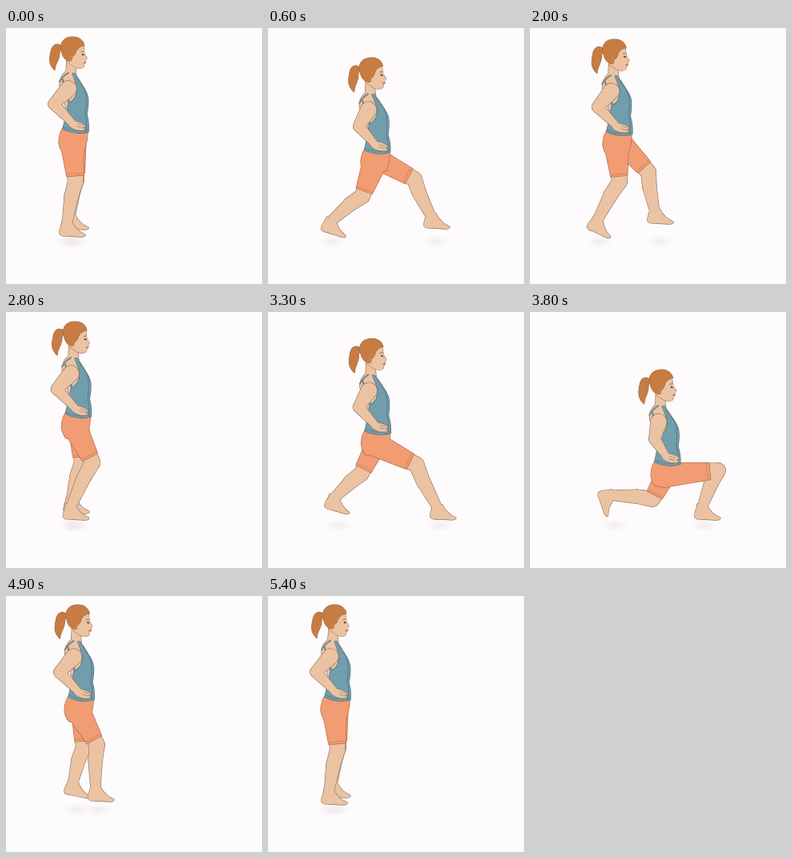
Animation of 320x320 px, one loop 5500 ms. Source, as an HTML page with a canvas:

```html
<!DOCTYPE html>
<html>
<head>
<meta charset="utf-8">
<style>
html, body { margin: 0; height: 100%; overflow: hidden; background: #fefbfc; }
canvas { display: block; width: 100vw; height: 100vh; }
</style>
</head>
<body>
<canvas></canvas>
<script>
const LUNGE = 2750, STEP = 100;
const SKIN = '#ebc3a2', SKIN_LINE = '#8d7565', SHORTS = '#f19c72', SHORTS_LINE = '#a9694f';
const SHIRT = '#719eac', SHIRT_LINE = '#4f6872', HAIR = '#c67c42', HAIR_LINE = '#9a5b2c';

const canvas = document.querySelector('canvas'), ctx = canvas.getContext('2d');
canvas.width = canvas.height = 320 * Math.max(1, devicePixelRatio);
ctx.scale(canvas.width / 320, canvas.height / 320);
ctx.lineJoin = ctx.lineCap = 'round';

// One lunge serves both legs. Body: time, shift x, y
const BODY = [
  [0, 0, 0], [50, 3, 1], [250, 14, 4], [600, 50, 26], [850, 70, 51], [1050, 76, 61],
  [1400, 76, 62], [1850, 44, 21], [2000, 25, 3], [2300, -4, -1], [LUNGE, 0, 0]];

// Monotone cubic through the keys, so held poses stay still
function sample(keys, t) {
  let i = 0;
  while (i < keys.length - 2 && keys[i + 1][0] <= t) i++;
  const a = keys[i], b = keys[i + 1], h = b[0] - a[0], u = (t - a[0]) / h;
  const rate = (j, c) => j < 0 || j > keys.length - 2 ? 0 :
    (keys[j + 1][c] - keys[j][c]) / (keys[j + 1][0] - keys[j][0]);
  const slope = (j, c) => {
    const p = rate(j - 1, c), q = rate(j, c);
    return p * q > 0 ? 2 * p * q / (p + q) : 0;
  };
  return a.slice(1).map((v, k) => {
    const c = k + 1, w = 1 - u;
    return v * (1 + 2 * u) * w * w + b[c] * u * u * (3 - 2 * u)
      + h * u * w * (slope(i, c) * w - slope(i + 1, c) * u);
  });
}

// Stepping leg: time, knee shift x, y, ankle shift x, y
const FRONT = [
  [0, 0, 0, 0, 0], [50, 19, -4, 4, -1], [250, 42, -8, 50, -5], [600, 95, 0, 124, -1],
  [850, 124, 5, 124, -1], [1050, 132, 6, 124, -1], [1400, 133, 6, 124, -1],
  [1850, 82, 4, 122, -2], [2000, 60, -9, 76, -7], [2150, 24, -6, 32, -4], [2300, 0, 0, 0, 0],
  [LUNGE, 0, 0, 0, 0]];

function stepPose(t, [kx, ky, ax, ay], stride) {
  const [dkx, dky, dax, day] = sample(FRONT, t);
  return [kx + dkx * stride, ky + dky, ax + dax * stride, ay + day, 0];
}

// Trailing leg: the same, then foot pitch
const REAR = [
  [0, 0, 0, 0, 0, 0], [50, 7, -1, 1, 0, 0], [600, 31, 18, 2, -4, 15], [850, 55, 43, 14, -7, 48],
  [1050, 65, 51, 20, -8, 68], [1400, 65, 51, 20, -8, 68], [1850, 42, 14, 10, -6, 30],
  [2000, 25, 0, 8, -5, 22], [2300, 0, 0, 0, 0, 0], [LUNGE, 0, 0, 0, 0, 0]];

function trailPose(t, [kx, ky, ax, ay], dip) {
  const [dkx, dky, dax, day, pitch] = sample(REAR, t);
  return [kx + dkx, ky + dky * dip, ax + dax, ay + day, pitch];
}

const NEAR_STAND = [87, 192, 76, 246], FAR_STAND = [88, 189, 80, 237];

const shape = d => new Path2D(d);
const FOOT = shape('M-6-5C-6 2-10 6-9 11Q-7 15 0 14L18 15Q24 15 23 12Q12 8 6-4Z');
const TORSO = shape('M76 40L75 54Q66 62 67 72L75 100H95L97 75Q92 65 88 61L87 51L92 40Z');
const TOP = shape('M71 64Q74 82 79 90Q76 108 71 126Q86 134 103 130Q104 118 101 108Q104 92 102 85Q99 75 92 69L86 57L83 57Q87 67 89 74Q90 88 79 94Q72 80 71 64Z');
const FACE = shape('M84 18Q95 16 97 23L98 32L101.5 38L99.5 40L100 43L98 45L97 49Q93 52 86 49L76 42V25Z');
const CAP = shape('M69 27C67 18 73 11 83 11C92 11 97 16 98 22Q92 22 88 28Q87 34 82 37Q84 42 78 41C72 39 70 34 69 27Z');
const TAIL = shape('M70 23C64 17 57 21 56 30C54 38 53 46 61 53C61 45 67 40 67 32Q67 26 71 28Z');
const PELVIS = shape('M71 125Q66 133 66 143Q67 152 72 157L98 152Q102 142 102 129Z');
const HAND = shape('M80 116Q90 116 98 121Q101 123 96 124L99 127Q95 129 87 127Q81 125 78 121Z');

// Outlines the union of several shapes
function draw(paths, fill, stroke, width = 1.3) {
  ctx.strokeStyle = stroke;
  ctx.fillStyle = fill;
  ctx.lineWidth = width;
  paths.forEach(p => ctx.stroke(p));
  paths.forEach(p => ctx.fill(p));
}

function line(d, color, width) {
  ctx.strokeStyle = color;
  ctx.lineWidth = width;
  ctx.stroke(shape(d));
}

function limb([ax, ay], ra, [bx, by], rb, flat) {
  const p = new Path2D(), d = Math.atan2(by - ay, bx - ax), q = Math.PI / 2;
  p.arc(ax, ay, ra, d + q, d + 3 * q);
  if (flat) {
    p.lineTo(bx + rb * Math.sin(d), by - rb * Math.cos(d));
    p.lineTo(bx - rb * Math.sin(d), by + rb * Math.cos(d));
  } else p.arc(bx, by, rb, d - q, d + q);
  p.closePath();
  return p;
}

function moved(path, x, y, angle = 0) {
  const p = new Path2D();
  p.addPath(path, new DOMMatrix().translate(x, y).rotate(angle));
  return p;
}

const mix = (a, b, k) => a.map((v, i) => v + (b[i] - v) * k);

function leg(hip, hipSize, [kx, ky, ax, ay, pitch], extra = []) {
  const knee = [kx, ky], ankle = [ax, ay], len = Math.hypot(ax - kx, ay - ky);
  const calf = mix(knee, ankle, .35);
  calf[0] -= (ay - ky) / len * 1.5;
  calf[1] += (ax - kx) / len * 1.5;
  draw([limb(hip, 11, knee, 9.3), limb(knee, 9.3, calf, 8.6), limb(calf, 8.6, ankle, 5.8),
    moved(FOOT, ax, ay, pitch)], SKIN, SKIN_LINE);
  draw([limb(hip, hipSize, mix(hip, knee, .85), 10.5, true), ...extra], SHORTS, SHORTS_LINE);
  ctx.strokeStyle = '#d9845d';
  ctx.lineWidth = .6;
  ctx.stroke(limb(mix(hip, knee, .79), 0, mix(hip, knee, .8), 10, true));
}

function shadow(x) {
  const g = ctx.createRadialGradient(0, 0, 0, 0, 0, 17);
  g.addColorStop(0, '#e9e4e6a0');
  g.addColorStop(1, '#e9e4e600');
  ctx.save();
  ctx.translate(x, 267);
  ctx.scale(1, .5);
  ctx.fillStyle = g;
  ctx.fillRect(-18, -18, 36, 36);
  ctx.restore();
}

function upperBody(x, y) {
  ctx.save();
  ctx.translate(84 + x, 135 + y);
  ctx.rotate(-Math.min(.04, Math.max(0, x) * .001));
  ctx.translate(-84, -135);
  draw([TORSO], SKIN, SKIN_LINE);
  draw([TOP], SHIRT, SHIRT_LINE);
  line('M89 61Q98 74 100 84Q101 95 99 107Q102 118 100 129', '#506c78', .7);
  line('M72 124Q86 131 102 128', '#58798a', .7);

  const bend = y * .2, shoulder = [78, 76], elbow = [60 + bend, 95 + bend * .2];
  const wrist = [83 + bend * .2, 119];
  draw([limb(shoulder, 10, elbow, 7), limb(elbow, 7, wrist, 4.3), moved(HAND, bend * .2, 0)],
    SKIN, SKIN_LINE);
  line('M90 120L97 122M89 123L96 125', SKIN_LINE, .6);
  line('M67 67Q71 60 78 56', '#77858b', 2);
  line('M84 58Q88 66 91 70', SHIRT, 2.5);

  draw([TAIL], HAIR, HAIR_LINE, 1);
  draw([FACE], SKIN, SKIN_LINE, 1);
  draw([CAP], HAIR, HAIR_LINE, 1);
  line('M80 36Q83 34 83 38Q82 41 80 40', '#cf9c7b', .8);
  line('M94 29.5L97 29', '#8a5a3a', .8);
  line('M95.5 33L96.8 33.6', '#4c3a33', 1.7);
  line('M97.5 43.5L99.3 43.3', '#cc6259', 1.6);
  ctx.restore();
}

function frame(now) {
  const time = Math.floor(now % (2 * LUNGE) / STEP) * STEP;
  const t = time % LUNGE, nearSteps = time >= LUNGE, stride = nearSteps ? 1.12 : 1;
  let [x, y] = sample(BODY, t);
  if (nearSteps) x = Math.max(0, x * stride);
  const near = nearSteps ? stepPose(t, NEAR_STAND, stride) : trailPose(t, NEAR_STAND, 1);
  const far = nearSteps ? trailPose(t, FAR_STAND, .88) : stepPose(t, FAR_STAND, stride);

  ctx.fillStyle = '#fefbfc';
  ctx.fillRect(0, 0, 320, 320);
  shadow(near[2] + 3);
  shadow(far[2] + 6);
  leg([87 + x, 138 + y], 13, far);
  leg([83 + x, 143 + y], 15, near, [moved(PELVIS, x, y)]);
  upperBody(x, y);
  requestAnimationFrame(() => frame(performance.now() - start));
}

const start = performance.now();
frame(0);
</script>
</body>
</html>
```
